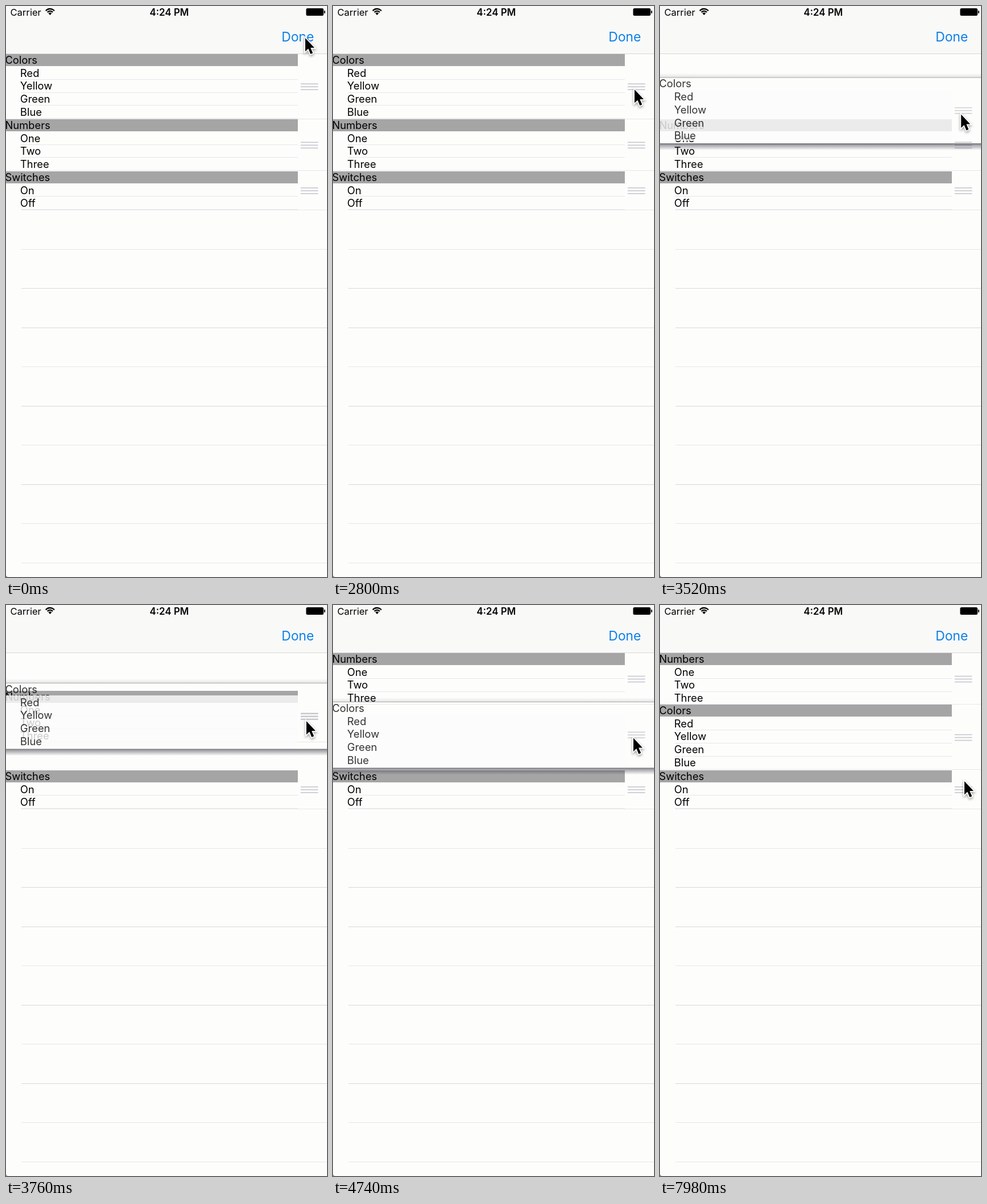
These frames come from a looping animation (561 px wide and 998 px high, 8 s). An HTML page with a canvas:

```html
<!DOCTYPE html>
<html lang="en">
<head>
<meta charset="utf-8">
<title>Reordering grouped rows</title>
<style>
  html, body { margin: 0; width: 100%; height: 100%; overflow: hidden; background: #fdfdfb; }
  canvas { display: block; }
</style>
</head>
<body>
<canvas width="561" height="998"></canvas>
<script>
const W = 561, H = 998, LOOP = 8000;
const ctx = document.querySelector('canvas').getContext('2d');
const FONT = 'Inter, "Liberation Sans", sans-serif';
const HEADER = 21, ROW = 22.8, LIST_RIGHT = 510, TEXT_SIZE = 18.3;
const FAINT = '#e7e7ec', LINE = '#d8d8de';

const colors = { title: 'Colors', rows: ['Red', 'Yellow', 'Green', 'Blue'], height: 113.8 };
const numbers = { title: 'Numbers', rows: ['One', 'Two', 'Three'], height: 90.4 };
const switches = { title: 'Switches', rows: ['On', 'Off'], height: 68 };

// Keys are [time, value, ...]; each stretch between two keys is eased.
const cursorKeys = [
  [20, 523, 56], [820, 526, 149], [1020, 519, 149], [1400, 523, 146], [1540, 523, 146],
  [1660, 527, 146], [2960, 527, 146], [3340, 527, 180.5], [3760, 525, 203], [4440, 525, 232.5],
  [4900, 525, 232.5], [5160, 527, 231], [6440, 527, 231], [6880, 531, 284], [6980, 531, 284],
  [7400, 532, 308]
];
const dragKeys = [[2960, 0], [3340, 34], [3760, 53], [4440, 86], [4880, 86], [5160, 90.4]];
const liftKeys = [[2840, 0], [3080, 1], [4880, 1], [5160, 0]];
const swapKeys = [[3622, 0], [3932, 1]];

const smooth = p => p * p * (3 - 2 * p);

function sample(keys, t) {
  if (t <= keys[0][0]) return keys[0].slice(1);
  for (let i = 1; i < keys.length; i++) {
    const [a, b] = [keys[i - 1], keys[i]];
    if (t < b[0]) {
      const p = smooth((t - a[0]) / (b[0] - a[0]));
      return a.slice(1).map((v, k) => v + (b[k + 1] - v) * p);
    }
  }
  return keys[keys.length - 1].slice(1);
}

function rect(x, y, w, h, color) {
  ctx.fillStyle = color;
  ctx.fillRect(x, y, w, h);
}

function text(str, x, y, size, color = '#000', weight = 400) {
  ctx.font = `${weight} ${size}px ${FONT}`;
  ctx.fillStyle = color;
  ctx.fillText(str, x, y);
}

function fade(y, h, from, to) {
  const g = ctx.createLinearGradient(0, y, 0, y + h);
  g.addColorStop(0, `rgba(40,40,60,${from})`);
  g.addColorStop(1, `rgba(40,40,60,${to})`);
  rect(0, y, W, h, g);
}

function drawLabels(cell, top) {
  text(cell.title, -1.5, top + 16.5, TEXT_SIZE);
  cell.rows.forEach((row, i) => text(row, 24.8, top + 39.5 + ROW * i, TEXT_SIZE));
}

function drawHandle(cell, top) {
  const mid = top + cell.height / 2;
  for (const d of [-5, 0, 5]) rect(515, mid + d - 0.5, 30.5, 1.6, '#c6c6d0');
}

function drawCell(cell, top, lineLeft = 0) {
  const y = Math.round(top);
  cell.rows.forEach((_, i) =>
    rect(26, Math.floor(top + 21.5 + ROW * (i + 1)), LIST_RIGHT - 26, 1, FAINT));
  rect(lineLeft, Math.round(top + cell.height) - 1, W - lineLeft, 1, FAINT);
  rect(0, y, LIST_RIGHT, HEADER, '#a5a5a5');
  drawLabels(cell, y);
  drawHandle(cell, top);
}

// While held, the title strip is clear and only the rows keep a translucent backing.
function drawLifted(cell, top, lift) {
  const bottom = top + cell.height + 0.7;
  ctx.globalAlpha = lift;
  fade(top - 8, 8, 0, 0.13);
  rect(0, top - 1, W, 1, 'rgba(0,0,0,.25)');
  rect(0, bottom, W, 2, 'rgba(0,0,0,.5)');
  fade(bottom + 2, 10, 0.46, 0);
  ctx.globalAlpha = 1 - 0.2 * lift;
  rect(0, top + HEADER, LIST_RIGHT, 89, '#fdfdfd');
  drawLabels(cell, top);
  drawHandle(cell, top);
  ctx.globalAlpha = 1;
}

function drawStatusBar() {
  text('Carrier', 7.5, 16.7, 16.5);
  text('4:24 PM', 251, 16.7, 16.8, '#000', 600);
  ctx.strokeStyle = '#000';
  ctx.lineWidth = 2.3;
  for (const r of [6.2, 10]) {
    ctx.beginPath();
    ctx.arc(77, 15, r, -Math.PI * 0.77, -Math.PI * 0.23);
    ctx.stroke();
  }
  ctx.fillStyle = '#000';
  ctx.beginPath();
  ctx.moveTo(77, 16);
  ctx.arc(77, 15.5, 4, -Math.PI * 0.77, -Math.PI * 0.23);
  ctx.fill();
  ctx.beginPath();
  ctx.roundRect(524.5, 4, 30.5, 13, 2.5);
  ctx.roundRect(555.8, 8, 2, 5, 1);
  ctx.fill();
}

function drawBackdrop() {
  rect(0, 0, W, H, '#fdfdfb');
  rect(0, 0, W, 83, '#f9f9f8');
  rect(0, 83, W, 1, '#d6d6d6');
  drawStatusBar();
  text('Done', 481.5, 62, 22.8, '#0c7fea');
  for (let i = 1; i < 10; i++) {
    const strong = [2, 3, 5, 7].includes(i);
    rect(27, Math.floor(356.7 + 68.5 * i), W - 27, 1, strong ? LINE : FAINT);
  }
  ctx.fillStyle = '#777';
  ctx.beginPath();
  ctx.moveTo(0, H - 4);
  ctx.quadraticCurveTo(0, H, 4, H);
  ctx.lineTo(0, H);
  ctx.fill();
}

const arrow = new Path2D('M0 0V23.5L5.3 18.5L9.3 28L13.2 26.3L9.2 17H16Z');

function drawCursor(x, y) {
  ctx.save();
  ctx.translate(x, y);
  ctx.shadowColor = 'rgba(0,0,0,.4)';
  ctx.shadowBlur = 4;
  ctx.shadowOffsetY = 2;
  ctx.strokeStyle = '#fff';
  ctx.lineWidth = 3.4;
  ctx.stroke(arrow);
  ctx.shadowColor = 'transparent';
  ctx.fillStyle = '#000';
  ctx.fill(arrow);
  ctx.restore();
}

function draw(t) {
  const [drag] = sample(dragKeys, t);
  const [lift] = sample(liftKeys, t);
  const [swap] = sample(swapKeys, t);
  drawBackdrop();
  drawCell(numbers, 84 + colors.height * (1 - swap));
  drawCell(switches, 288.6, 27);
  if (lift > 0) drawLifted(colors, 84 + drag, lift);
  else drawCell(colors, 84 + drag);
  drawCursor(...sample(cursorKeys, t));
}

const start = performance.now();
function tick() {
  draw((performance.now() - start) % LOOP);
  requestAnimationFrame(tick);
}
tick();
</script>
</body>
</html>
```
